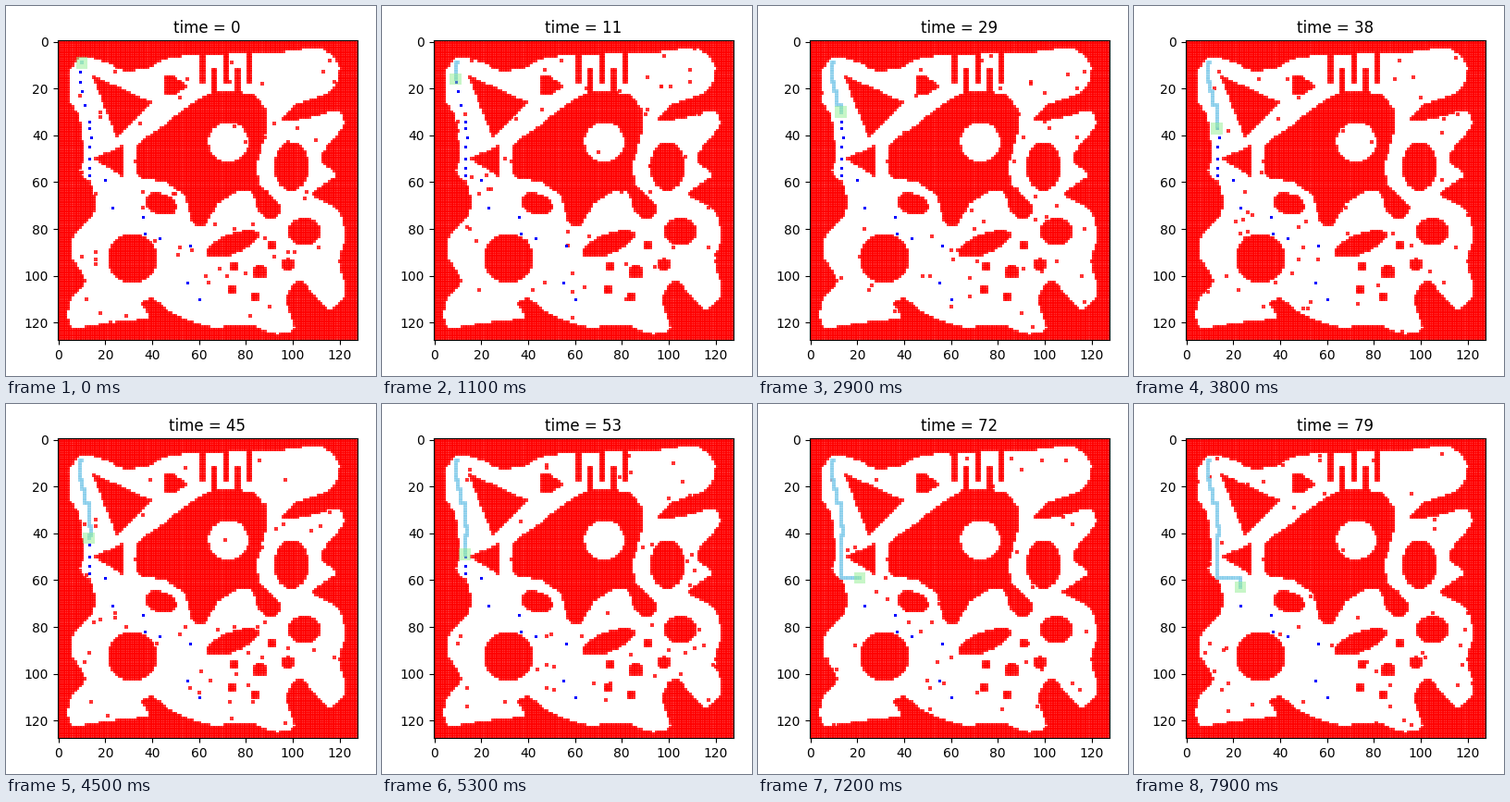
A matplotlib script for the animation above (8 s loop, 400x400 px).

```python
import numpy as np
import matplotlib.pyplot as plt
from matplotlib.animation import FuncAnimation
from matplotlib.path import Path
from matplotlib.patches import Rectangle

N = 128
FRAMES = 80
NOISE = 100
PX = 0.72  # points per pixel at 100 dpi

# Key points of the two large outlines, in grid units.
ROOM = [(10, 6.2), (4.5, 13), (4.5, 25), (8.5, 32), (10.5, 48), (9, 56),
        (14.5, 62), (14.5, 74), (6.5, 82), (5.5, 92), (11, 102), (4.5, 111),
        (5, 122), (18, 121), (28, 119.5), (39, 118), (36, 112), (40, 110),
        (50, 117), (64, 122), (82, 121.5), (92, 125), (101, 123), (97.5, 110),
        (103, 102), (111, 111), (117, 114.5), (123, 107), (120, 94),
        (122.5, 84), (120, 72), (109, 65), (119, 57), (112, 49.5), (122, 36),
        (119, 29), (106, 32.5), (96, 33), (102, 27), (117, 21), (120, 10),
        (112, 2.5), (96, 4), (72, 5), (48, 6.5), (38, 11), (28, 12.2),
        (20, 8.5)]
ISLAND = [(66, 21.8), (55, 28), (45, 36), (34, 44.5), (34, 57), (46, 60),
          (54, 66), (57.5, 77.5), (62.5, 78), (68, 69), (76, 64), (83, 64.5),
          (86, 73), (92, 75.8), (94.5, 70), (86, 61), (84.8, 52), (88, 40),
          (88.5, 30), (84, 23.5), (77, 21.8)]
WEDGES = [[(14.8, 14.8), (39.8, 26.2), (25, 40.8)],
          [(15.5, 49.8), (27.4, 44.8), (27.4, 57.3)],
          [(45.4, 14.6), (49, 14.6), (54.8, 18.8), (49.5, 22.6), (45.4, 23)]]
# centre x, y, radii, tilt in degrees
ROCKS = [(31.5, 92.5, 10.2, 10.2, 0), (99.5, 53.2, 7.1, 10.1, 0),
         (43.7, 69.3, 6.6, 4.2, 20), (74.4, 86.3, 11.5, 4, -22),
         (105, 81.2, 6.7, 5.6, 0), (86, 98.2, 2.7, 2.7, 0),
         (98, 95.2, 2.7, 2.3, 0)]
POND = (72.6, 42.8, 8.8, 8.8, 0)
CRATES = [(75, 96), (91, 87), (74, 106), (84, 109)]

START = (10, 9)
GOALS = [(9, 13), (9, 17), (10, 21), (11, 27), (13, 34), (13, 37), (14, 41),
         (13, 45), (13, 50), (13, 54), (13, 57), (20, 59), (23, 71), (36, 75),
         (37, 82), (43, 84), (56, 87), (55, 103), (60, 110)]
# Cells covered at a few moments; the robot now and then waits a tick.
TIMES = [0, 11, 29, 38, 53, 65, 79]
COVERED = [0, 8, 26, 33, 47, 59, 71]

yy, xx = np.mgrid[:N, :N]
cells = np.column_stack([xx.ravel(), yy.ravel()])


def smooth(points, tension=0.35):
    """Closed cardinal spline through the points."""
    p = np.array(points, float)
    q = np.roll(p, -1, axis=0)
    m = tension * (q - np.roll(p, 1, axis=0))
    n = np.roll(m, -1, axis=0)
    u = np.linspace(0, 1, 10, endpoint=False)[None, :, None]
    p, q, m, n = (a[:, None] for a in (p, q, m, n))
    curve = ((2 * u**3 - 3 * u**2 + 1) * p + (u**3 - 2 * u**2 + u) * m
             + (3 * u**2 - 2 * u**3) * q + (u**3 - u**2) * n)
    return curve.reshape(-1, 2)


def inside(poly):
    return Path(poly).contains_points(cells).reshape(N, N)


def ellipse(cx, cy, rx, ry, tilt):
    c, s = np.cos(np.radians(tilt)), np.sin(np.radians(tilt))
    dx, dy = xx - cx, yy - cy
    return ((c * dx + s * dy) / rx) ** 2 + ((c * dy - s * dx) / ry) ** 2 <= 1


def build_walls():
    wall = ~inside(smooth(ROOM)) | inside(smooth(ISLAND))
    for wedge in WEDGES:
        wall |= inside(wedge)
    for rock in ROCKS:
        wall |= ellipse(*rock)
    for x, y in CRATES:
        wall[y - 1:y + 2, x - 1:x + 2] = True
    for i in range(5):  # comb: teeth hang from the top or rise from the island
        x = 61 + 5 * i
        rows = slice(12, 23) if i % 2 else slice(0, 18)
        wall[rows, x:x + 2] = True
    return wall & ~ellipse(*POND)


def walk(start, goals):
    """Cell by cell to each goal, along the shorter axis first."""
    pos = list(start)
    cells_passed = [start]
    for goal in goals:
        gap = [g - p for g, p in zip(goal, pos)]
        for axis in sorted((0, 1), key=lambda a: abs(gap[a])):
            for _ in range(abs(gap[axis])):
                pos[axis] += int(np.sign(gap[axis]))
                cells_passed.append(tuple(pos))
    return cells_passed


wall = build_walls()
route = walk(START, GOALS)

fig, ax = plt.subplots(figsize=(4, 4), dpi=100, facecolor="white")
ax.set_xlim(-0.5, N - 0.5)
ax.set_ylim(N - 0.5, -0.5)
ax.set_aspect("equal")
ax.set_xticks(range(0, N, 20))
ax.set_yticks(range(0, N, 20))
title = ax.set_title("time = 0")
fig.tight_layout()


def squares(color, size, alpha=1, z=2):
    return ax.plot([], [], "s", color=color, ms=size * PX, mew=0,
                   alpha=alpha, zorder=z)[0]


wall_dots = squares("red", 4, 0.8)
wall_dots.set_data(xx[wall], yy[wall])
noise_dots = squares("red", 4, 0.8, 2.1)
goal_dots = squares("blue", 3, z=2.2)
trail = squares("skyblue", 5, 0.8, 2.3)
robot = ax.add_patch(Rectangle((0, 0), 5, 5, fc="lightgreen", ec="none",
                               alpha=0.5, zorder=2.4))


def update(t):
    rng = np.random.default_rng(100 + t)
    nx, ny = rng.integers(0, N, (2, NOISE))
    free = ~wall[ny, nx]
    noise_dots.set_data(nx[free], ny[free])

    k = int(round(np.interp(t, TIMES, COVERED)))
    trail.set_data(*zip(*route[:k + 1]))
    goal_dots.set_data(*zip(*[g for g in GOALS if g not in route[:k]]))
    x, y = route[k]
    robot.set_xy((x - 2.5, y - 2.5))
    title.set_text(f"time = {t}")
    return noise_dots, goal_dots, trail, robot, title


anim = FuncAnimation(fig, update, frames=FRAMES, interval=100, repeat=True,
                     repeat_delay=0, blit=False)
plt.show()
```
